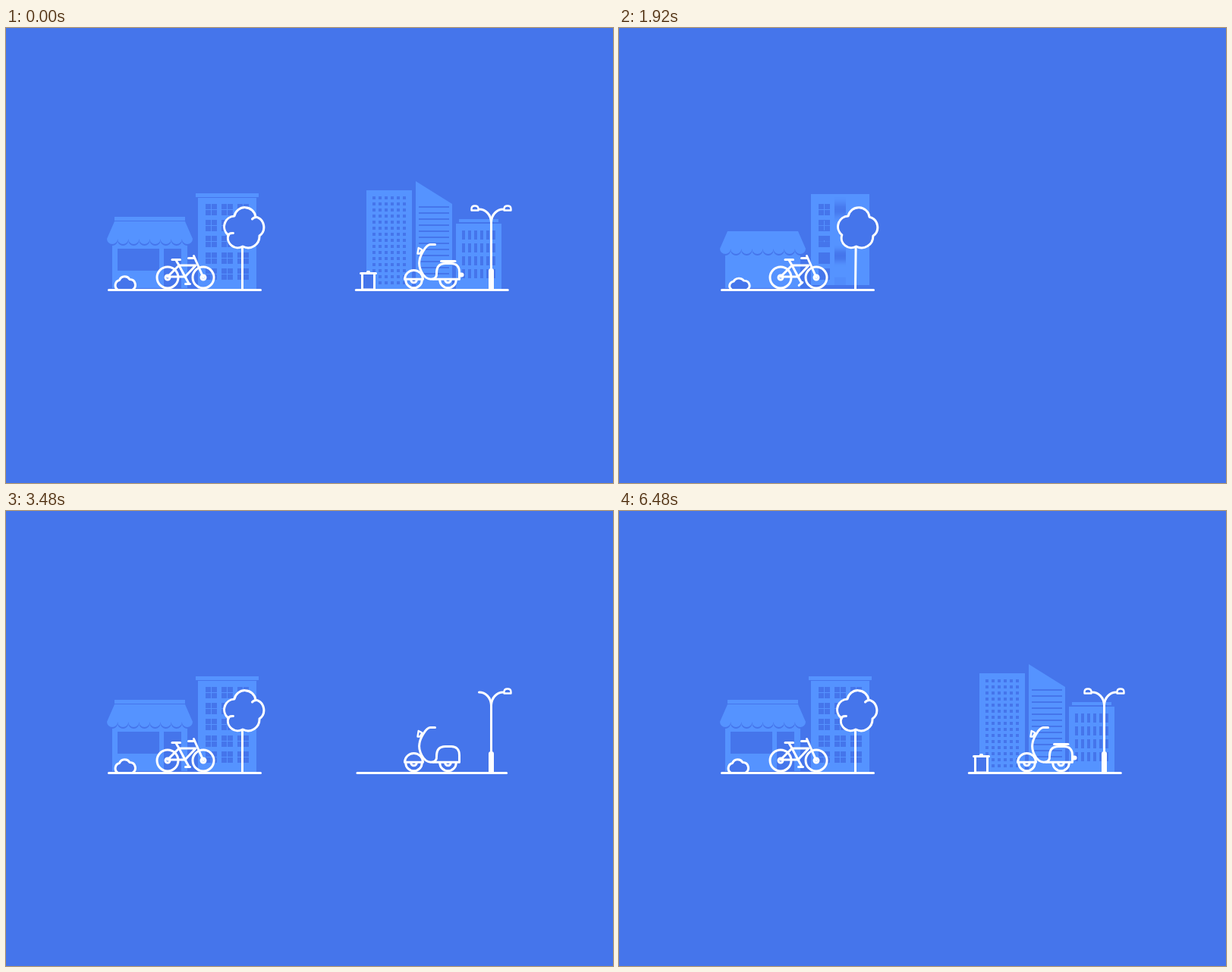
An HTML page that plays this animation: 800x600 px, repeating every 6600 ms.

```html
<!DOCTYPE html>
<html lang="en">
<head>
<meta charset="utf-8">
<title>Street scenes</title>
<style>
html, body { margin: 0; width: 100%; height: 100%; overflow: hidden; background: #4575eb; }
svg { display: block; width: 800px; height: 600px; }
.line { fill: none; stroke: #fff; stroke-width: 3; stroke-linecap: round; stroke-linejoin: round; }
.thin { stroke-width: 2.4; }
.solid { fill: #4575eb; }
.white { fill: #fff; }
.wall { fill: #5593ff; }
.hole { fill: #4575eb; }
</style>
</head>
<body>
<svg id="stage" viewBox="0 0 800 600"><defs id="defs"></defs></svg>
<script>
const NS = 'http://www.w3.org/2000/svg';
const LOOP = 6600, STEP = 40, BLURS = 6;
const stage = document.getElementById('stage');
const parts = [];

const make = (name, attrs, parent = stage) => {
  const el = document.createElementNS(NS, name);
  for (const key in attrs) el.setAttribute(key, attrs[key]);
  return parent.appendChild(el);
};

// Vertical motion blur in a few strengths
for (let i = 1; i <= BLURS; i++) {
  const f = make('filter', {
    id: 'blur' + i, filterUnits: 'userSpaceOnUse', x: 0, y: 0, width: 800, height: 600,
    'color-interpolation-filters': 'sRGB'
  }, document.getElementById('defs'));
  make('feGaussianBlur', { stdDeviation: '0 ' + i * 0.8 }, f);
}

const clamp = v => Math.max(0, Math.min(1, v));
const easeOut = p => 1 - (1 - p) ** 2;
const box = (x, y, w, h) => `M${x},${y}h${w}v${h}h${-w}z`;
const disc = (x, y, r) => `M${x - r},${y}a${r},${r} 0 1 1 ${2 * r},0a${r},${r} 0 1 1 ${-2 * r},0z`;

function add(cls, d, motion, parent) {
  const el = make('path', { class: cls, d }, parent);
  if (motion) parts.push({ el, motion });
  return el;
}

function group(motion) {
  const el = make('g', {});
  if (motion) parts.push({ el, motion });
  return el;
}

// Fall into place, then hop once
const drop = (t0, h = 36, d = 160, hop = 0, hopTime = 360) => t => {
  const p = (t - t0) / d;
  if (p < 0) return { o: 0 };
  if (p < 1) return { y: -h * (1 - p * p), o: clamp(0.15 + p * 1.6) };
  const u = clamp((t - t0 - d) / hopTime);
  return { y: -hop * Math.sin(Math.PI * u) };
};

const grow = (t0, d, x, y, horizontal) => t => {
  const p = easeOut(clamp((t - t0) / d));
  return p ? { ox: x, oy: y, sx: horizontal ? p : 1, sy: horizontal ? 1 : p } : { o: 0 };
};

const sway = (t0, angle, fade, period, x, y) => t => {
  const s = Math.max(0, t - t0);
  return { ox: x, oy: y, r: angle * Math.exp(-s / fade) * Math.cos(2 * Math.PI * s / period) };
};

// Ground spreads from its middle
function ground(cx, t0) {
  const el = make('path', { class: 'line' });
  const keys = [[0, 0], [560, 0.67], [760, 0.767], [1320, 1]];
  return t => {
    const s = t - t0;
    let k = 1;
    for (let i = 1; i < keys.length; i++) {
      const [a, va] = keys[i - 1], [b, vb] = keys[i];
      if (s < b) {
        const p = clamp((s - a) / (b - a));
        k = va + (vb - va) * (i === 1 ? p * (1.4 - 0.4 * p) : p);
        break;
      }
    }
    const half = 100 * k;
    el.setAttribute('d', `M${cx - half},345.5H${cx + half}`);
    el.style.display = s > 0 ? '' : 'none';
  };
}

// Shop
add('wall', box(140, 278, 99, 65), drop(1450, 30, 120));
add('hole', box(147, 291, 55, 29), grow(2160, 240, 147, 291));
add('hole', box(208, 291, 23, 52), grow(2260, 240, 208, 291));
const awning = group(t => {
  if (t < 1620) return drop(1500, 36, 120)(t);
  const down = clamp((t - 1620) / 120), up = easeOut(clamp((t - 1980) / 160));
  return { y: 13 * down * (1 - up) };
});
const canopy = 'M143,255H236L246,278' + 'a7.06,7.06 0 0 1 -14.125,0'.repeat(8) + 'z';
add('hole', canopy, null, awning).setAttribute('transform', 'translate(0 2)');
add('wall', canopy, null, awning);
add('wall', box(143, 249, 93, 5), drop(2100, 24, 120, 2, 200));

// Block of flats
add('wall', box(253, 224, 77, 120), drop(1620, 25, 120, 5));
add('wall', box(250, 218, 83, 5), drop(2160, 2, 120, 2, 200));
for (let i = 0; i < 15; i++) {
  const x = 263 + 21 * Math.floor(i / 5), y = 232 + Math.round(21.2 * (i % 5));
  add('hole', box(x, y, 15, 15), drop(1650 + 38 * i, -55, 80));
  add('wall', box(x + 7, y, 1, 15) + box(x, y + 7, 15, 1), grow(1830 + 42 * i, 80, x, y + 7));
}

// Towers
add('wall', box(475, 214, 60, 131), drop(3830, 32, 120, 3));
add('wall', 'M540,202L588,232V345H540z', drop(3853, 32, 120, 4));
add('wall', box(593, 258, 60, 87), drop(3823, 32, 120, 3));
add('wall', box(597, 252, 52, 4), drop(4240, 24, 120, 2, 200));
for (let row = 0; row < 15; row++) {
  let dots = '';
  for (let col = 0; col < 6; col++) dots += box(483 + 8 * col, 222 + 8 * row, 4, 4);
  add('hole', dots, drop(4160 + 36 * row, 8, 100));
}
for (let i = 0; i < 12; i++) {
  add('hole', box(544, 235 + 8 * i, 40, 2), grow(4180 + 36 * i, 200, 544, 0, true));
}
for (let col = 0; col < 6; col++) {
  for (let row = 0; row < 4; row++) {
    const x = 601 + 8 * col, y = 267 + 17 * row;
    add('hole', box(x, y, 4, 12), grow(4260 + 45 * col + 40 * row, 160, x, y));
  }
}

// Bush
add('line solid', 'M147,345A7,7 0 0 1 149.5,332.5A7.6,7.6 0 0 1 163,331.5A7.3,7.3 0 0 1 167,345', t => {
  const p = clamp((t - 1780) / 140);
  if (!p) return { o: 0 };
  const s = Math.max(0, t - 1920);
  const swing = Math.exp(-s / 220) * Math.cos(2 * Math.PI * s / 480);
  return { ox: 157, oy: 345, x: 1.6 * swing, sy: p * (1 - 0.13 * swing) };
});

// Bicycle
[[213, 687], [260, 712]].forEach(([x, t0]) => {
  const wheel = group(drop(t0));
  add('line', disc(x, 329, 14), null, wheel);
  add('line', disc(x, 329, 3), null, wheel);
});
add('line', 'M213,328L228,313H250L236,328H213M228,313L236,328', drop(707));
add('line', 'M224,306L228,313', drop(860));
add('line', 'M219,305.5H229.5', drop(920));
add('line', 'M247.5,300.5L260,329', drop(960));
add('line', 'M240.5,303.5H248', drop(1020));
add('line', 'M236,328L240.5,336', drop(1080, 20));
const pedal = group(drop(1160, 20));
add('line', 'M236.5,337.5H242.5', t => {
  const s = Math.max(0, t - 1920);
  return { ox: 239.5, oy: 337.5, r: -40 * Math.exp(-s / 130) * Math.cos(2 * Math.PI * s / 440) };
}, pedal);

// Tree
const tree = group(sway(1400, 10, 190, 520, 311.5, 345));
add('line', 'M311.5,345V288', grow(1230, 120, 311.5, 345), tree);
add('line solid', 'M301,248A14.2,14.2 0 0 1 329,249A14,14 0 0 1 334,274A15,15 0 0 1 312,288' +
  'A13,13 0 0 1 293,273A14,14 0 0 1 301,248z', drop(1330, 36, 100), tree);
add('line', 'M293,274Q293.5,270 299.5,270.5', grow(2300, 160, 293, 272, true), tree);
add('line', 'M330,249.5Q326.5,249.5 324.5,252', grow(2400, 160, 330, 250, true), tree);

// Scooter
[[537.5, 2814], [582.5, 2830]].forEach(([x, t0]) => {
  const wheel = group(drop(t0));
  add('line', `M${x - 10.8},332A10.8,10.8 0 0 0 ${x + 10.8},332`, null, wheel);
  add('line', `M${x - 3.8},332A3.8,3.8 0 0 0 ${x + 3.8},332`, null, wheel);
});
add('line', 'M525.5,331.3A12,11.8 0 0 1 549.5,331.3z', drop(2820));
add('line', 'M567.5,323C567.5,314 572,310.5 579,310.5H587C594,310.5 597.5,315 597.5,322V331.3H563', drop(2827));
add('line', 'M565.5,285.5H559C553,286 546,300 545,306C543,316 550,331.3 560,331.3C566,331.3 568,328 567.5,322', drop(3060));
add('line thin', 'M543.7,290L548.5,292.5L545.5,297.5H542.5z', drop(3300, 24));
add('white', 'M598,322.5H600.5A3,3 0 0 1 600.5,328.5H598z', drop(3500, 20));
add('line', 'M573.5,307.5H592', drop(3767));

// Street lamp
add('line', 'M639.5,345V256', grow(3180, 160, 639.5, 345));
add('white', 'M636,345V320Q636,317 639.5,317Q643,317 643,320V345z', grow(3240, 160, 639.5, 345));
add('line', 'M639.5,257C639.5,246 632,239 623.5,239', grow(3330, 120, 639.5, 257));
add('line', 'M639.5,257C639.5,246 647,239 655.5,239', grow(3330, 120, 639.5, 257));
[[613.5, 3980], [656.5, 3360]].forEach(([x, t0]) => {
  add('line thin', `M${x},240.5V238.5Q${x},234.5 ${x + 4.5},234.5Q${x + 9},234.5 ${x + 9},238.5V240.5z`, drop(t0, 8, 100));
});

// Litter bin
const bin = group(sway(3920, 9.5, 260, 400, 477.5, 344.5));
add('line solid', 'M469.5,323.5V345H485.5V323.5z', drop(3620, 30), bin);
add('line', 'M467.5,323.5H487.5', drop(3965, 20, 120), bin);
add('line', 'M476.5,321.5H478.5', drop(3900, 18, 140), bin);

const grounds = [ground(235.5, 80), ground(561.3, 2200)];

function pose({ el, motion }, t) {
  const { x = 0, y = 0, r = 0, sx = 1, sy = 1, ox = 0, oy = 0, o = 1 } = motion(t);
  el.style.display = o > 0 ? '' : 'none';
  if (o <= 0) return;
  el.setAttribute('opacity', o);
  el.setAttribute('transform',
    `translate(${x + ox} ${y + oy}) rotate(${r}) scale(${sx} ${sy}) translate(${-ox} ${-oy})`);
  const before = motion(t - 20).y;
  const speed = before === undefined ? 0 : Math.abs(y - before);
  const level = Math.min(BLURS, Math.round(speed / 2.6));
  if (level) el.setAttribute('filter', `url(#blur${level})`);
  else el.removeAttribute('filter');
}

function render(now) {
  let t = Math.floor((now % LOOP) / STEP) * STEP;
  if (t < 80 || t > 5040) t = LOOP;
  parts.forEach(part => pose(part, t));
  grounds.forEach(update => update(t));
}

const start = performance.now();
function frame() {
  render(performance.now() - start);
  requestAnimationFrame(frame);
}
frame();
</script>
</body>
</html>
```
